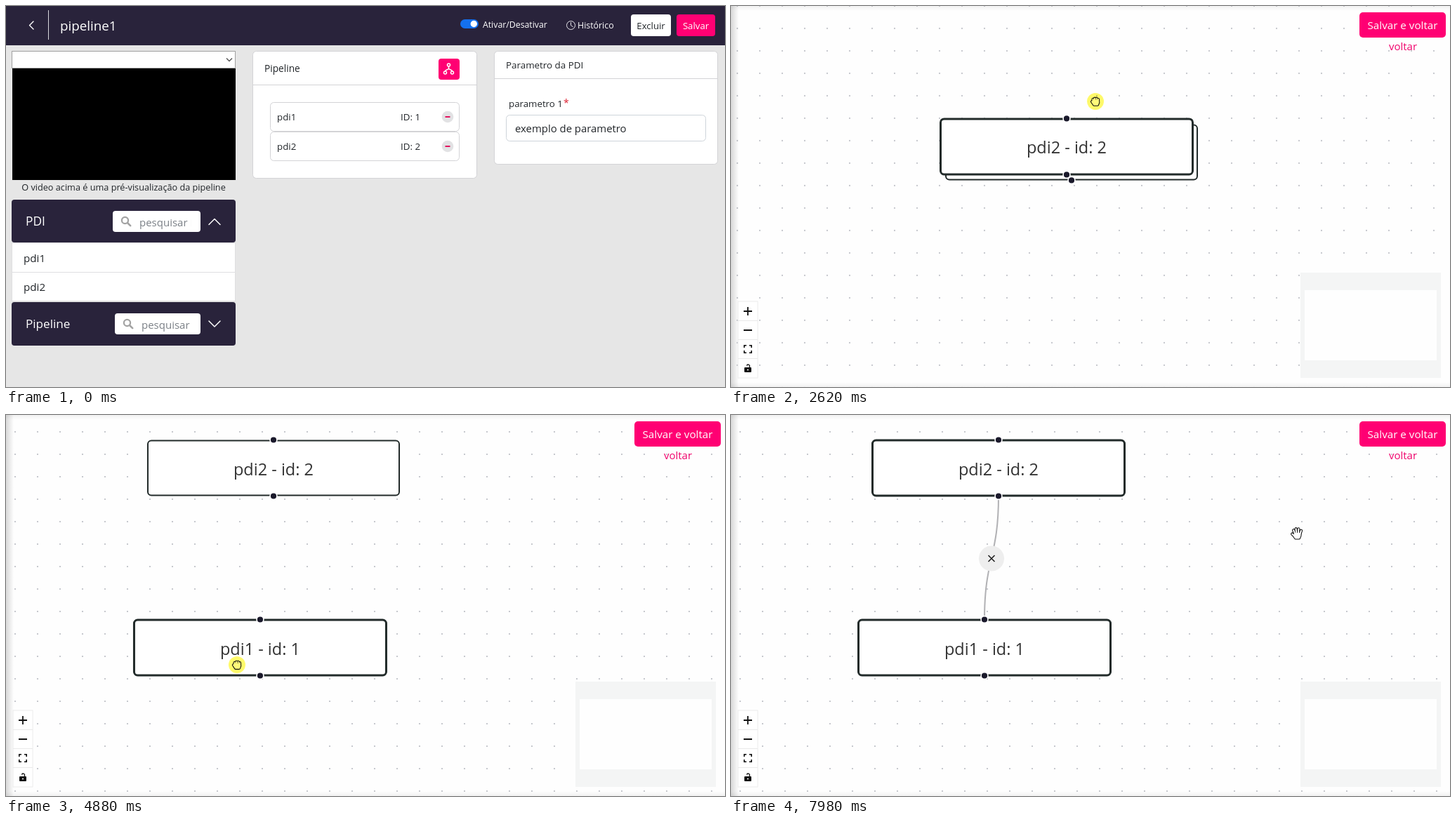
An HTML page that plays this animation: 1024 by 543 pixels, repeating every 8000 ms.

```html
<!DOCTYPE html>
<html lang="pt">
<head>
<meta charset="utf-8">
<title>Editor de pipeline</title>
<style>
  html, body { margin: 0; width: 100%; height: 100%; overflow: hidden; background: #e6e6e6; }
  svg { display: block; width: 100vw; height: 100vh; }
  text { font-family: "Open Sans", "Noto Sans", sans-serif; white-space: pre; }
</style>
</head>
<body>
<svg id="stage" viewBox="0 0 1024 543" preserveAspectRatio="none"></svg>
<script>
const LOOP = 8000;
const PAGE_SWITCH = 1390;
const PINK = '#ff0073', DARK = '#29233b', INK = '#212529', BORDER = '#d3d3d6';

// ---- markup helpers ----
const rect = (x, y, w, h, fill, r = 0, extra = '') =>
  `<rect x="${x}" y="${y}" width="${w}" height="${h}" rx="${r}" fill="${fill}" ${extra}/>`;
const box = (x, y, w, h, r = 5, stroke = BORDER) =>
  rect(x + .5, y + .5, w - 1, h - 1, '#fff', r, `stroke="${stroke}"`);
const text = (x, y, size, str, fill = INK, extra = '') =>
  `<text x="${x}" y="${y}" font-size="${size}" fill="${fill}" ${extra}>${str}</text>`;
const line = (d, stroke, width = 1, extra = '') =>
  `<path d="${d}" fill="none" stroke="${stroke}" stroke-width="${width}" ${extra}/>`;
const circle = (x, y, r, fill, extra = '') =>
  `<circle cx="${x}" cy="${y}" r="${r}" fill="${fill}" ${extra}/>`;
const MIDDLE = 'text-anchor="middle"';
const ROUND = 'stroke-linecap="round" stroke-linejoin="round"';

const search = (x, y, w, label) =>
  rect(x, y, w, 30, '#fff', 4) +
  circle(x + 17.5, y + 13.5, 4.6, 'none', 'stroke="#a3a3a3" stroke-width="2.2"') +
  line(`M${x + 21} ${y + 17}l4.2 4.2`, '#a3a3a3', 2.6, ROUND) +
  `<svg x="${x}" y="${y}" width="${w - 13}" height="30">${text(38, 22, 15, label, '#7b8087')}</svg>`;

const listRow = (y, name, num, id) =>
  `<g>${rect(376.5, y + .5, 269, 41, '#fff', 5, `stroke="${BORDER}" id="${id}"`)}
  ${text(386, y + 26, 13.3, name)}${text(562, y + 26, 13.3, 'ID: ' + num)}
  ${circle(629, y + 21, 8.3, '#e2e2e4')}${rect(625.5, y + 20, 7, 2, '#e3125f')}</g>`;

const header = () =>
  rect(0, 0, 1024, 56, DARK) +
  line('M39 22l-5.5 5.5l5.5 5.5', '#fff', 1.4, ROUND) +
  line('M60.5 6v42', '#d9d8de') +
  text(77, 35, 18.8, 'pipeline1', '#fff') +
  rect(647, 19, 26, 13, '#1470ee', 6.5) + circle(666.3, 25.5, 4.7, '#fff') +
  text(679, 31, 12.3, 'Ativar/Desativar', '#fff', 'font-weight="500"') +
  circle(804.5, 27.5, 6, 'none', 'stroke="#e8e7ec"') +
  line('M804.5 23.5v4.2l2.8 1.8', '#e8e7ec', 1, ROUND) +
  text(814, 32, 12.4, 'Histórico', '#fff', 'font-weight="500"') +
  rect(890, 12, 57, 31, '#fff', 4) + text(918.5, 33, 13.2, 'Excluir', INK, MIDDLE) +
  rect(955, 12, 55, 31, PINK, 4) + text(982.5, 33, 13.2, 'Salvar', '#fff', MIDDLE);

const sidebar = () =>
  box(8, 64, 319, 25, 0, '#a0a0a0') +
  line('M314 74.5l4 4l4 -4', '#555', 1.4) +
  rect(9, 89, 318, 159, '#000') +
  text(167.5, 263, 12.7, 'O video acima é uma pré-visualização da pipeline', INK, MIDDLE) +
  rect(8, 276, 319, 61, DARK, 4) + text(28, 313, 17.3, 'PDI', '#fff') +
  search(152, 292, 125, 'pesquisar PDI') +
  line('M289 311.5l8 -8l8 8', '#fff', 1.5, ROUND) +
  box(8, 337, 319, 84, 0, '#dfdfe1') + line('M9 379.5h317', '#dfdfe1') +
  text(25, 365, 15.2, 'pdi1') + text(25, 406, 15.2, 'pdi2') +
  rect(8, 422, 319, 62, DARK, 4) + text(28, 459, 17.1, 'Pipeline', '#fff') +
  search(155, 438, 122, 'pesquisar') +
  line('M289 449l8 8l8 -8', '#fff', 1.5, ROUND);

const panels = () =>
  box(351, 64, 320, 182) + line('M352 112.5h318', BORDER) +
  text(368, 94, 13.7, 'Pipeline') +
  listRow(137, 'pdi1', 1, 'row1') + listRow(179, 'pdi2', 2, 'row2') +
  rect(616, 75, 30, 30, PINK, 4, 'id="flowBtn"') +
  `<g id="flowIcon">${line('M630.5 85.5v3.5c0 2 -5 1.5 -5 4M630.5 89c0 2 5 1.5 5 4', '#fff', 1.5)}
  ${[[630.5, 84], [625.5, 95], [635.5, 95]].map(p => circle(...p, 2, PINK, 'stroke="#fff" stroke-width="1.5"')).join('')}</g>` +
  text(546, 94, 14.9, 'Editar Fluxo', '#fff', MIDDLE + ' id="flowText" font-weight="500"') +
  box(695, 64, 319, 162) + line('M696 103.5h317', BORDER) +
  text(712, 89, 13.4, 'Parametro da PDI') +
  text(716, 144, 13.3, 'parametro 1') + text(794, 143, 14, '*', '#dc2030') +
  box(712, 155, 285, 38, 5, '#ced4da') + text(725, 180, 14.9, 'exemplo de parametro');

// Node drawn with its top left corner at 0,0
const node = id =>
  `<g id="node${id}"><rect class="frame" fill="#fff" stroke="#222b2a" rx="5"/>
  ${[0, 80].map(y => circle(180, y, 4.9, '#1a192b', 'stroke="#fff" stroke-width="1.6"')).join('')}
  ${text(180, 50, 23.5, `pdi${id} - id: ${id}`, '#333', MIDDLE)}</g>`;

const controls = () =>
  rect(10, 421, 28, 109, '#fff', 0, 'stroke="#ececec"') +
  [448.5, 475.5, 502.5].map(y => line(`M10 ${y}h28`, '#e9e9e9')).join('') +
  line('M18 435h12M24 429v12M18 462h12', '#111', 1.8) +
  line('M18.8 487v-3.2h3.2M26 483.8h3.2v3.2M29.2 491v3.2h-3.2M22 494.2h-3.2v-3.2', '#111', 1.6) +
  rect(19, 515, 10, 7, '#111', 1) + circle(24, 518.5, 1, '#fff') +
  line('M26.5 515v-1.5a2 2 0 0 0 -4 -.8', '#111', 1.3);

const gradient = (id, x, y, alpha) =>
  `<linearGradient id="${id}" x2="${x}" y2="${y}"><stop stop-opacity="${alpha}"/><stop offset="1" stop-opacity="0"/></linearGradient>`;

const flowPage = () =>
  `<defs><pattern id="dots" width="32" height="32" patternUnits="userSpaceOnUse">${circle(16, 16, 1.1, '#b9bbc2')}</pattern>
  ${gradient('fadeLeft', 1, 0, .15)}${gradient('fadeTop', 0, 1, .05)}</defs>` +
  rect(0, 0, 1024, 543, '#fefefe') + rect(0, 0, 1024, 543, 'url(#dots)') +
  rect(0, 0, 11, 543, 'url(#fadeLeft)') + rect(0, 0, 1024, 7, 'url(#fadeTop)') +
  `<g transform="matrix(1 0 0 -1 0 543)">${rect(0, 0, 1024, 7, 'url(#fadeTop)')}</g>` +
  line('', '#b1b1b4', 2, 'id="edge"') + node(1) + node(2) +
  `<g id="edgeBtn">${circle(371, 204.5, 18, '#eee')}${line('M366.5 200l9 9M375.5 200l-9 9', '#222', 1.6)}</g>` +
  rect(811, 380, 200, 150, '#f4f5f5') + rect(817, 405, 188, 100, '#fefefe') + controls() +
  rect(895, 9, 123, 36, PINK, 5) + text(956.5, 33, 15.2, 'Salvar e voltar', '#fff', MIDDLE) +
  text(957, 63, 15, 'voltar', '#f0046c', MIDDLE);

// Hands: a black silhouette below a slightly thinner filled one
const hand = (id, d, palm) => {
  const layer = (cls, w) =>
    `<g class="${cls}" stroke-width="${w}" ${ROUND}><path d="${d}" fill="none"/><path d="${palm}"/></g>`;
  return `<g id="${id}">${layer('outline', 4.2)}${layer('skin', 2.1)}</g>`;
};
const cursorMarkup = () =>
  `<g id="cursor">${circle(0, 0, 12, '#fffa6a', 'id="halo" style="mix-blend-mode:multiply"')}
  ${hand('open', 'M-3 0L-4.8 -4.8M-.8 -1L-1.4 -6.8M2 -1L2.4 -6.6M4.6 0L6 -4.2M-3 4L-6.8 .6', 'M-3 0L4.6 0L4.4 3L3 6.4L-2 6.4L-4 3.4Z')}
  ${hand('closed', 'M-3.4 -1V-3M-1 -1V-4.2M1.6 -1V-4.2M4 -1V-2.8M-3 2L-5 .4', 'M-3.4 -1L4 -1L4.2 1.5L3 4.8L-2 4.8L-3.8 2Z')}</g>`;

const $ = id => document.getElementById(id);
$('stage').innerHTML =
  `<g id="formPage">${rect(0, 0, 1024, 543, '#e6e6e6')}${header()}${sidebar()}${panels()}</g>
  <g id="flowPage">${flowPage()}</g>${cursorMarkup()}`;

// ---- motion ----
const PATH = [
  [160, 935, 558], [700, 660, 190], [880, 622, 92], [960, 619, 88], [1590, 619, 88],
  [2000, 590, 262], [2200, 590, 262], [2300, 583, 254], [2330, 583, 254], [2430, 546, 200],
  [2620, 519, 136], [2780, 523, 128], [2830, 523, 128], [2980, 519, 198], [3080, 519, 198],
  [3500, 481, 156], [3800, 418, 81], [3900, 418, 81], [4250, 456, 225], [4330, 456, 225],
  [4640, 410, 321], [4880, 329, 356], [4930, 328, 356], [5020, 328, 356], [5450, 380, 125],
  [5600, 381, 120], [5950, 381, 120], [6050, 376, 151], [6640, 361, 295], [7530, 361, 295],
  [7980, 806, 169], [8000, 806, 169]
];
const PRESSES = [
  [1350, 1390, 'open'], [2200, 2330, 'closed'], [2430, 2800, 'closed'],
  [3050, 3830, 'closed'], [4300, 5000, 'closed'], [5950, 7150, 'open']
];

const clamp = (v, a, b) => Math.min(b, Math.max(a, v));
const smooth = (t, a, b) => { const u = clamp((t - a) / (b - a), 0, 1); return u * u * (3 - 2 * u); };
const within = (t, a, b) => t >= a && t < b;

const slope = (i, k) => PATH[i] && PATH[i + 1]
  ? (PATH[i + 1][k] - PATH[i][k]) / (PATH[i + 1][0] - PATH[i][0]) : 0;
const tangent = (i, k) => {
  const a = slope(i - 1, k), b = slope(i, k);
  return a * b > 0 ? 2 * a * b / (a + b) : 0;
};

// Monotone cubic through the path points
function cursorAt(t) {
  t = clamp(t, PATH[0][0], LOOP);
  let i = 0;
  while (i < PATH.length - 2 && t >= PATH[i + 1][0]) i++;
  const p = PATH[i], q = PATH[i + 1], h = q[0] - p[0], u = (t - p[0]) / h;
  return [1, 2].map(k => {
    const ease = u * u * (3 - 2 * u);
    return p[k] + (q[k] - p[k]) * ease
      + h * u * (1 - u) * ((1 - u) * tangent(i, k) - u * tangent(i + 1, k));
  });
}

function dragged(t, from, to) {
  const a = cursorAt(from), b = cursorAt(clamp(t, from, to));
  return [b[0] - a[0], b[1] - a[1]];
}

const set = (el, attrs) => { for (const k in attrs) el.setAttribute(k, attrs[k]); };
const show = (id, on) => { $(id).style.display = on ? '' : 'none'; };

function placeNode(id, moves, selected) {
  const x = 332 + moves.reduce((s, m) => s + m[0], 0);
  const y = 232.5 + moves.reduce((s, m) => s + m[1], 0);
  const inset = selected ? .5 : 1;
  const el = $('node' + id);
  set(el, { transform: `translate(${x} ${y})` });
  set(el.querySelector('.frame'), {
    x: inset, y: inset, width: 360 - 2 * inset, height: 80 - 2 * inset, 'stroke-width': selected ? 3 : 2
  });
}

function drawForm(t) {
  const grow = smooth(t, 840, 1120);
  const x = 616 - 181.5 * grow;
  set($('flowBtn'), { x, width: 646 + 13.5 * grow - x });
  $('flowIcon').style.opacity = 1 - smooth(t, 840, 920);
  $('flowText').style.opacity = .92 * smooth(t, 960, 1300);
  set($('row2'), { fill: t > 690 ? '#fffdfb' : '#fff' });
}

function drawFlow(t) {
  const pan = dragged(t, 2430, 2800);
  set($('dots'), { patternTransform: `translate(${pan[0] - 12} ${pan[1] - 16})` });
  placeNode(1, [pan, dragged(t, 4330, 4930)], t >= 4300);
  placeNode(2, [pan, dragged(t, 2200, 2330), dragged(t, 3080, 3800)],
    within(t, 2200, 4300) || t >= 5950);

  let d = '';
  if (t >= 5950) {
    const [x, y] = t < 7150 ? cursorAt(t - 30) : [361, 291.5];
    const end = Math.min(y, 291.5), mid = (115.5 + end) / 2;
    d = `M381 115.5C381 ${mid} ${x} ${mid} ${x} ${end}`;
  }
  set($('edge'), { d });
  show('edgeBtn', t >= 7150);
}

function drawCursor(t) {
  const [x, y] = cursorAt(t);
  const press = PRESSES.find(p => within(t, p[0], p[1]));
  const closed = !!press && press[2] === 'closed';
  set($('cursor'), { transform: `translate(${x} ${y})` });
  show('halo', press);
  show('open', !closed);
  show('closed', closed);
  document.querySelectorAll('.outline').forEach(el => set(el, { stroke: '#111', fill: '#111' }));
  const skin = press ? '#fff97a' : '#fff';
  document.querySelectorAll('.skin').forEach(el => set(el, { stroke: skin, fill: skin }));
}

function draw(t) {
  const flow = t >= PAGE_SWITCH;
  show('formPage', !flow);
  show('flowPage', flow);
  flow ? drawFlow(t) : drawForm(t);
  drawCursor(t);
}

const start = performance.now();
function tick() {
  draw((performance.now() - start) % LOOP);
  requestAnimationFrame(tick);
}
tick();
</script>
</body>
</html>
```
